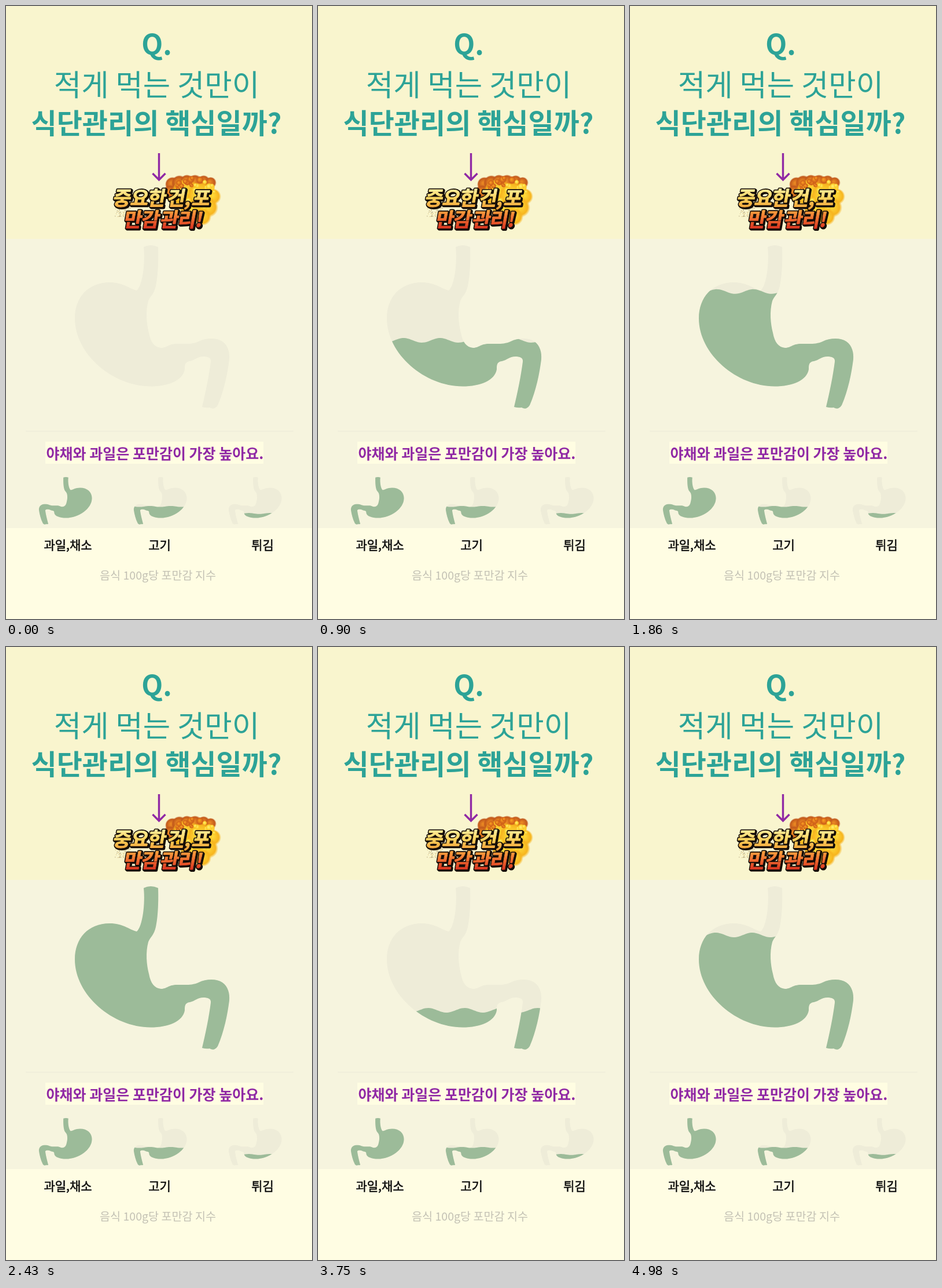
Recreate the animation shown at these times as an HTML page with a canvas. Size 529 px wide and 1058 px high, loop 5.01 s.

```html
<!DOCTYPE html>
<html lang="ko">
<head>
<meta charset="utf-8">
<style>
html, body { margin: 0; width: 100%; height: 100%; overflow: hidden; background: #fffde3; }
canvas { display: block; width: 529px; height: 1058px; }
</style>
</head>
<body>
<canvas id="stage" width="529" height="1058"></canvas>
<script>
const W = 529, H = 1058, LOOP = 5010, STEP = 30;
const RESTART = 3180, OFFSET = 3150, FULL = 2430;
const FONT = '"Noto Sans CJK KR", "Noto Sans CJK", "Noto Sans", sans-serif';
const EMPTY = '#eeecd8', GREEN = '#9cbb99', TEAL = '#2da397', PURPLE = '#9029a5', INK = '#111';
const ctx = document.getElementById('stage').getContext('2d');

const stomach = new Path2D(
  'M238 416 Q250 410 263 416 C264 445 262 470 259 483 C256 497 250 500 246 509 ' +
  'C241 527 243 549 247 564 C250 581 257 589 268 590 C278 590 281 583 296 583 ' +
  'C312 583 322 584 333 579 C345 573 364 572 374 579 C384 586 387 598 386 610 ' +
  'C383 634 377 664 366 689 Q360 698 352 693 Q346 694 339 692 ' +
  'C345 667 351 638 354 614 C355 607 349 605 341 605 C331 605 327 611 318 613 ' +
  'C309 614 309 620 309 627 C306 646 281 656.5 250 656.5 ' +
  'C185 656.5 119 601 119 539 C119 503 142 477 179 477 ' +
  'C203 477 211 487 226 491 C236 483 241 443 238 416 Z');

// liquid height over time: [ms, y]
const LEVELS = [[120, 702], [570, 632], [930, 572], [1080, 553], [1410, 533],
  [1620, 516], [1830, 497], [2160, 451], [2430, 405]];

function levelAt(t) {
  if (t <= LEVELS[0][0]) return 720;
  for (let i = 1; i < LEVELS.length; i++) {
    const [t0, y0] = LEVELS[i - 1], [t1, y1] = LEVELS[i];
    if (t <= t1) return y0 + (y1 - y0) * (t - t0) / (t1 - t0);
  }
  return 390;
}

function fillBelow(c, y, amp, crest, length, x0, x1) {
  c.save();
  c.clip(stomach);
  c.beginPath();
  c.moveTo(x0, 720);
  for (let x = x0; x <= x1; x += 3) {
    c.lineTo(x, y - amp * Math.cos((x - crest) / length * Math.PI * 2));
  }
  c.lineTo(x1, 720);
  c.fillStyle = GREEN;
  c.fill();
  c.restore();
}

function text(c, str, x, y, size, weight, color) {
  c.font = `${weight} ${size}px ${FONT}`;
  c.fillStyle = color;
  c.fillText(str, x, y);
}

// regular weight thickened to a medium
function label(c, str, x) {
  text(c, str, x, 938, 21, 400, INK);
  c.strokeStyle = INK;
  c.lineWidth = .6;
  c.strokeText(str, x, 938);
}

function arrow(c) {
  c.strokeStyle = PURPLE;
  c.lineWidth = 3.4;
  c.beginPath();
  c.moveTo(264.5, 254);
  c.lineTo(264.5, 300);
  c.moveTo(253.5, 289);
  c.lineTo(264.5, 300);
  c.lineTo(275.5, 289);
  c.stroke();
}

function seeded(seed) {
  return () => (seed = seed * 16807 % 2147483647) / 2147483647;
}

function puff(c, x, y, r, inner, outer) {
  const g = c.createRadialGradient(x - r * .2, y - r * .2, r * .1, x, y, r);
  g.addColorStop(0, inner);
  g.addColorStop(.75, outer);
  g.addColorStop(1, outer + '00');
  c.fillStyle = g;
  c.beginPath();
  c.arc(x, y, r, 0, Math.PI * 2);
  c.fill();
}

function explosion(c) {
  const rnd = seeded(41);
  [[288, 308, 13], [300, 306, 14], [313, 303, 12], [327, 304, 13], [342, 303, 11],
   [354, 305, 10], [284, 322, 13]].forEach(p => puff(c, ...p, '#e98722', '#c2591c'));
  [[312, 325, 27], [338, 330, 27], [358, 329, 14], [350, 348, 17], [340, 364, 15], [322, 355, 22]]
    .forEach(p => puff(c, ...p, '#ffdd3c', '#f7b51f'));
  for (let i = 0; i < 60; i++) {
    const a = rnd() * 6.28, d = Math.sqrt(rnd());
    const x = 324 + Math.cos(a) * d * 38, y = 324 + Math.sin(a) * d * 27;
    const hot = x - 300 + (y - 310) * 1.8 > 24;
    puff(c, x, y, 2 + rnd() * 5, hot ? '#ffee6a' : '#f79a22', hot ? '#fcc926' : '#cf5f18');
  }
  for (let i = 0; i < 60; i++) {
    c.fillStyle = rnd() < .6 ? '#c9a65699' : '#75603e88';
    c.fillRect(188 + rnd() * 28, 347 + rnd() * 16, 1.2, 1.2);
  }
}

function sticker(c, str, x, y, stops) {
  c.save();
  c.translate(x, y);
  c.transform(1, 0, -.18, 1, 0, 0);
  c.font = `900 34px ${FONT}`;
  c.letterSpacing = '-1px';
  c.wordSpacing = '-4px';
  c.lineJoin = 'round';
  c.strokeStyle = '#150d08';
  c.lineWidth = 4;
  for (let i = 3; i >= 0; i--) c.strokeText(str, i * .8, i * .7);
  const g = c.createLinearGradient(0, -29, 0, 4);
  stops.forEach((s, i) => g.addColorStop(i / (stops.length - 1), s));
  c.fillStyle = c.strokeStyle = g;
  c.lineWidth = .8;
  c.fillText(str, 0, 0);
  c.strokeText(str, 0, 0);
  c.restore();
}

function icon(c, x, level, crest, ductless) {
  c.save();
  c.translate(x, 813);
  c.scale(-.343, .29);
  c.translate(-386, -413);
  c.fillStyle = EMPTY;
  c.fill(stomach);
  fillBelow(c, level, level > 420 ? 3 : 0, crest, 105, 100, ductless ? 314 : 400);
  c.restore();
}

function drawBase() {
  const base = document.createElement('canvas');
  base.width = W;
  base.height = H;
  const c = base.getContext('2d');
  const rect = (color, x, y, w, h) => { c.fillStyle = color; c.fillRect(x, y, w, h); };
  rect('#f9f5ce', 0, 0, W, 403);
  rect('#f6f4de', 0, 402, W, 499);
  rect('#fffde3', 0, 901, W, 157);
  rect('#efedda', 34, 733, 463, 1.5);
  rect('#fffde2', 68, 752, 377, 38);

  c.textAlign = 'center';
  text(c, 'Q.', 260.5, 83.5, 48, 700, TEAL);
  text(c, '적게 먹는 것만이', 260.5, 154.5, 51.6, 400, TEAL);
  text(c, '식단관리의 핵심일까?', 260, 220, 48, 700, TEAL);
  text(c, '야채와 과일은 포만감이 가장 높아요.', 257.5, 781.5, 25, 700, PURPLE);
  label(c, '과일,채소', 107);
  label(c, '고기', 265.5);
  label(c, '튀김', 443.5);
  text(c, '음식 100g당 포만감 지수', 262.5, 990, 19.6, 400, '#c3c1b4');

  arrow(c);
  explosion(c);
  sticker(c, '중요한 건, 포', 267, 344, ['#fff0a0', '#fbd45f', '#f4a53b']);
  sticker(c, '만감 관리!', 270, 381, ['#f9a63f', '#ee692f', '#d7301f']);

  icon(c, 57, 400, 0);
  icon(c, 221, 588, 200);
  icon(c, 385, 630, 285, true);

  c.fillStyle = EMPTY;
  c.fill(stomach);
  return base;
}

const base = drawBase();

function frame() {
  const now = Math.floor(performance.now() % LOOP / STEP) * STEP;
  const t = now < RESTART ? now : now - OFFSET;
  ctx.drawImage(base, 0, 0);
  if (t >= FULL) {
    ctx.fillStyle = GREEN;
    ctx.fill(stomach);
  } else {
    fillBelow(ctx, levelAt(t), 4, 213 + (t - 930) * .068, 63, 110, 395);
  }
  requestAnimationFrame(frame);
}
frame();
</script>
</body>
</html>
```
